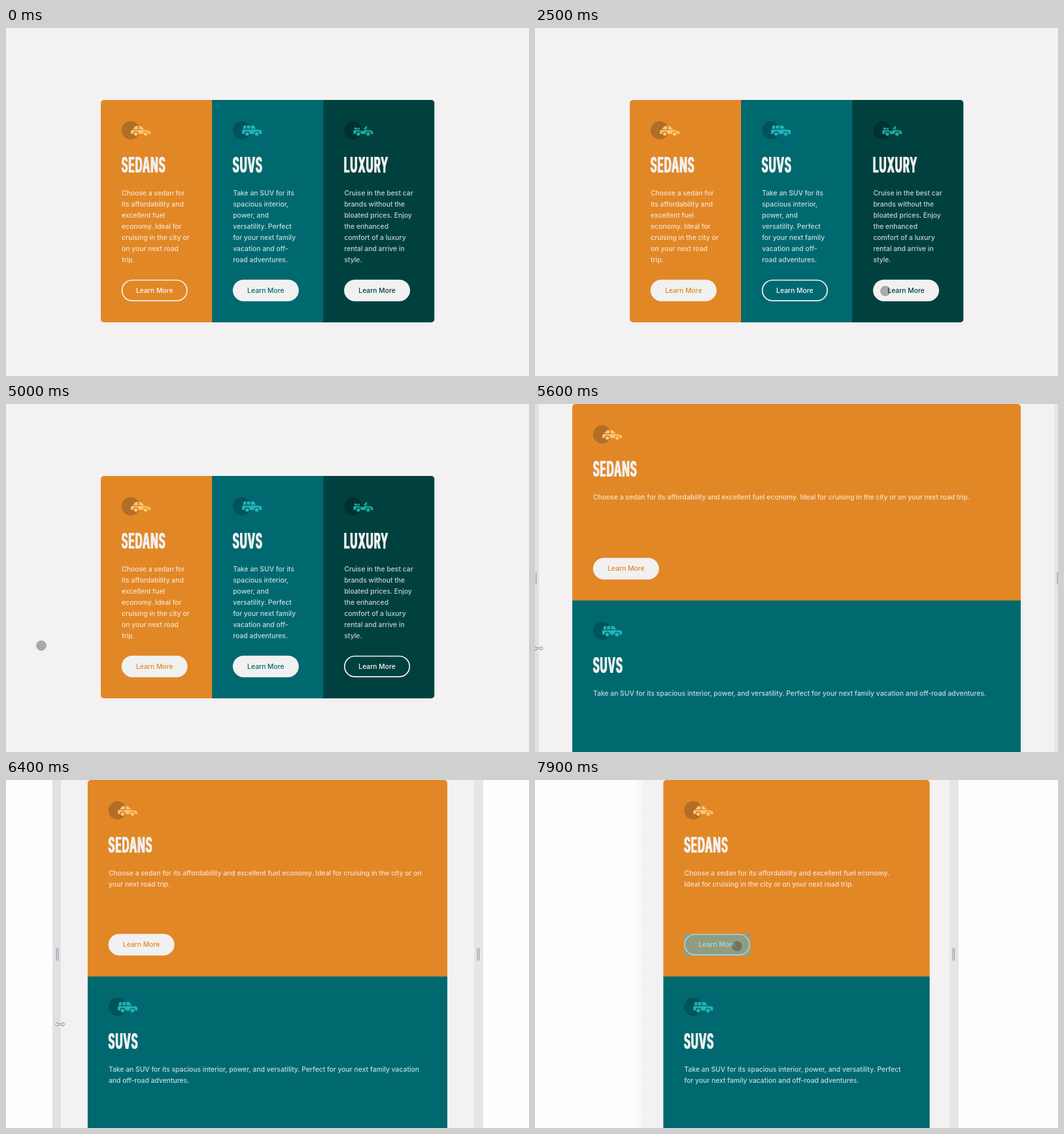
Write an HTML page that moves like this. It is 800 by 532 pixels and loops after 8 s.

```html
<!DOCTYPE html>
<html lang="en">
<head>
<meta charset="utf-8">
<title>Car cards</title>
<style>
  html, body { margin: 0; width: 100%; height: 100%; overflow: hidden; background: #f3f1f2; }
  svg { display: block; width: 100vw; height: 100vh; }
  text { font-family: Inter, "Open Sans", sans-serif; font-weight: 500; font-size: 10.35px; }
  .copy { fill: #fff; fill-opacity: .77; }
  .title { font-size: 32px; font-weight: 700; letter-spacing: 2px; fill: #f2f0f0; }
</style>
</head>
<body>
<svg id="stage" viewBox="0 0 800 532"></svg>
<script>
const stage = document.getElementById('stage');
const LOOP = 8000, STEP = 100;
const PAPER = '#f3f1f2';
const CHASSIS = 'V13H26.6A4.1 4.1 0 0 0 18.4 13H11.6A4.1 4.1 0 0 0 3.4 13H0V9Z';

// tail and ends: words that may close the first wide line, with the line width up to each.
const cards = [
  {
    name: 'SEDANS', fill: '#e28726', disc: '#b26d26', car: '#ffc56f',
    shape: 'M3 6L6 2Q7 .8 9 .8H11V6ZM12.4 .8H14Q17 1.5 20 6H12.4ZM1 7H21Q29 8 30 10' + CHASSIS,
    narrow: 'Choose a sedan for|its affordability and|excellent fuel|economy. Ideal for|cruising in the city or|on your next road|trip.',
    head: 'Choose a sedan for its affordability and excellent fuel',
    tail: 'economy. Ideal for cruising in the city or on your next road trip.',
    ends: [315, 344, 360, 403, 414, 434, 455, 469, 482, 507, 533, 557, 581]
  },
  {
    name: 'SUVS', fill: '#006970', disc: '#00535a', car: '#22b4ba',
    shape: 'M1 5L2.6 0H6V5ZM7.2 0H12V5H7.2ZM13.4 0H18L21 5H13.4ZM0 6.3H22Q29 6.6 30 8' + CHASSIS,
    narrow: 'Take an SUV for its|spacious interior,|power, and|versatility. Perfect|for your next family|vacation and off-|road adventures.',
    head: 'Take an SUV for its spacious interior, power, and versatility.',
    tail: 'Perfect for your next family vacation and off-road adventures.',
    ends: [331, 350, 373, 397, 431, 477, 499, 545, 604]
  },
  {
    name: 'LUXURY', fill: '#00413f', disc: '#00312f', car: '#19ac9f',
    shape: 'M1 4L4 2.5L6 5L9 3L10 6H2ZM16 6L19 .8L21 2L20 6ZM0 7.2L9 7L13 9L17 7H23Q29 7.5 30 10' + CHASSIS,
    narrow: 'Cruise in the best car|brands without the|bloated prices. Enjoy|the enhanced|comfort of a luxury|rental and arrive in|style.'
  }
];

// Linear interpolation through [time, ...values] keys.
function track(keys, t) {
  let i = 1;
  while (i < keys.length - 1 && t > keys[i][0]) i++;
  const a = keys[i - 1], b = keys[i];
  const p = Math.min(1, Math.max(0, (t - a[0]) / (b[0] - a[0])));
  return a.slice(1).map((v, k) => v + (b[k + 1] - v) * p);
}

const rect = (x, y, w, h, fill, extra = '') =>
  `<rect x="${x}" y="${y}" width="${w}" height="${h}" fill="${fill}" ${extra}/>`;

const label = (x, y, str, attrs) => `<text x="${x}" y="${y}" ${attrs}>${str}</text>`;

function wrapWide(card, room) {
  const words = card.tail.split(' ');
  const fit = card.ends.filter(end => end <= room).length;
  return [card.head + ' ' + words.slice(0, fit).join(' '), words.slice(fit).join(' ')];
}

function button(card, x, y, active) {
  const box = active
    ? rect(x + .8, y + .8, 99.4, 31.4, 'none', 'rx="15.7" stroke="#f5f1ee" stroke-width="1.7"')
    : rect(x, y, 101, 33, '#f2f1f1', 'rx="16.5"');
  return box + label(x + 50.5, y + 20.2, 'Learn More',
    `text-anchor="middle" fill="${active ? '#fbf8f4' : card.fill}"`);
}

// Content of one card; (x, y) is the card's corner.
function content(card, x, y, lines, buttonTop, active) {
  const title = [-1.3, 1.3].map(dx => label(dx, 0, card.name, 'class="title"')).join('');
  return `<circle cx="${x + 45.6}" cy="${y + 46.4}" r="13.8" fill="${card.disc}"/>
    <g transform="translate(${x + 46} ${y + 39})" fill="${card.car}">
      <path d="${card.shape}"/><circle cx="7.5" cy="13" r="2.8"/><circle cx="22.5" cy="13" r="2.8"/>
    </g>
    <g transform="translate(${x + 31.5} ${y + 111}) scale(.475 1)">${title}</g>`
    + lines.map((line, i) => label(x + 32, y + 145.6 + i * 17, line, 'class="copy"')).join('')
    + button(card, x + 31.7, y + buttonTop, active);
}

function columns(activeIndex) {
  const fills = cards.map((c, i) => rect(145 + i * 170.2, 110, 171 - (i === 2 ? .8 : 0), 340, c.fill)).join('');
  return '<clipPath id="round"><rect x="145" y="110" width="510.4" height="340" rx="5"/></clipPath>'
    + `<g clip-path="url(#round)">${fills}</g>`
    + cards.map((c, i) => content(c, 145 + i * 170.2, 110, c.narrow.split('|'), 274.7, i === activeIndex)).join('');
}

const grip = (x, fill) => rect(x, 257, 1, 19, fill) + rect(x + 2.6, 257, 1, 19, fill);

function stacked(left, dragging, tapped) {
  const right = 800 - left, view = right - left;
  const width = view * .8705, x = 400 - width / 2;
  const leftBar = dragging
    ? rect(left - 13, 0, 13, 532, '#dfe2e5') + grip(left - 7.3, '#8a8d90')
    : rect(left - 14, 0, 14, 532, 'url(#fade)');
  const [sedan, suv] = cards;
  return rect(0, 0, 800, 532, '#fefefe')
    + '<linearGradient id="fade"><stop stop-color="#fefefe"/><stop offset="1" stop-color="#f4f4f5"/></linearGradient>'
    + rect(left, 0, view, 532, PAPER) + leftBar
    + rect(right, 0, 14, 532, '#e6e6e6') + grip(right + 4.6, '#8c8c8c')
    + `<path d="M${x} 301V5a5 5 0 0 1 5-5H${x + width - 5}a5 5 0 0 1 5 5V301Z" fill="${sedan.fill}"/>`
    + rect(x, 300.4, width, 240, suv.fill)
    + content(sedan, x, 0, wrapWide(sedan, width - 64), 235.2, tapped)
    + content(suv, x, 300.4, wrapWide(suv, width - 64), 235.2, false)
    + (tapped ? rect(x + 31.5, 235, 101.5, 34, '#33b5e5', 'fill-opacity=".46"') : '');
}

const touchPoint = ([x, y]) =>
  `<circle cx="${x}" cy="${y}" r="7.3" fill="#373737" fill-opacity=".38" stroke="#6b625e" stroke-opacity=".5"/>`;

const resizeArrow = (x, y) =>
  `<path transform="translate(${x} ${y})" d="M-7.5 0L-4-3.2V-1H4V-3.2L7.5 0L4 3.2V1H-4V3.2Z" fill="#fff" stroke="#777" stroke-width=".8"/>`;

const pointer = [
  [100, 51, 350], [500, 190, 385], [1000, 385, 403], [1900, 388, 403], [2500, 536, 402],
  [2700, 556, 403], [3700, 556, 403], [4000, 510, 366], [4600, 180, 362], [5200, -9, 373]
];
const edge = [[5500, 0], [5600, 6], [6300, 74], [6400, 84], [6700, 121], [7000, 158], [7100, 166]];
const finalMove = [[7200, 172, 373], [7400, 232, 320], [7700, 309, 254]];

function draw(t) {
  let scene = rect(0, 0, 800, 532, PAPER);
  if (t < 5500) {
    scene += columns(t < 1300 ? 0 : t < 3000 ? 1 : 2);
    if (t >= 100 && t < 5200) scene += touchPoint(track(pointer, t));
    else if (t >= 5200) scene += resizeArrow(0, 373);
  } else {
    const [left] = track(edge, t), dragging = t < 7200;
    scene += stacked(left, dragging, t >= 7900);
    scene += dragging ? resizeArrow(left - 1, 373.5) : touchPoint(track(finalMove, t));
  }
  stage.innerHTML = scene;
}

const start = performance.now();
let shown = -1;
function tick() {
  const elapsed = Math.max(0, performance.now() - start) % LOOP;
  const t = Math.floor(elapsed / STEP) * STEP;
  if (t !== shown) draw(shown = t);
  requestAnimationFrame(tick);
}
tick();
</script>
</body>
</html>
```
